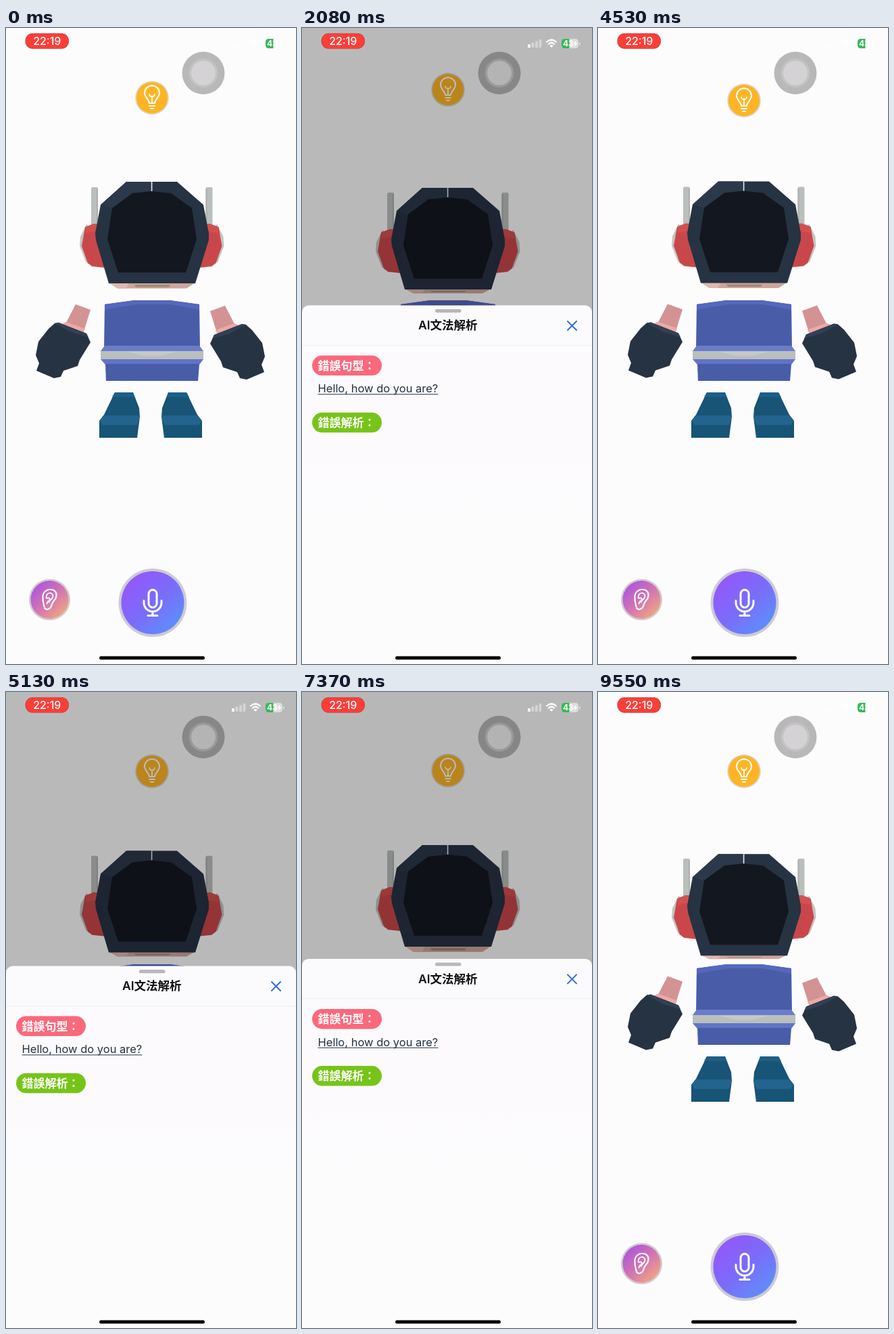
Animation, 429 px wide and 939 px high, one loop 9620 ms. Source, as an HTML page with a canvas:

```html
<!DOCTYPE html>
<html lang="zh-Hant">
<head>
<meta charset="utf-8">
<title>AI文法解析</title>
<style>
html, body { margin: 0; width: 100%; height: 100%; overflow: hidden; background: #fdfdfd; }
canvas { display: block; width: 429px; height: 939px; }
</style>
</head>
<body>
<canvas id="stage"></canvas>
<script>
const W = 429, H = 939, LOOP = 9620;
const canvas = document.getElementById('stage');
const ctx = canvas.getContext('2d');
const ratio = window.devicePixelRatio || 1;
canvas.width = W * ratio;
canvas.height = H * ratio;

const FONT = 'Inter, "Noto Sans CJK TC", "Noto Sans CJK", sans-serif';
const NAVY = '#263343', INDIGO = '#485ca8', SILVER = '#babfbc';

// Motion as [seconds, y] points
const bulbPath = [[0, 103], [1.05, 117], [2.12, 91], [3.24, 117], [4.15, 92], [4.53, 107], [5.15, 117],
  [5.99, 98], [6.25, 92], [7.25, 117], [8.2, 92], [8.49, 107], [9.35, 117], [9.62, 117]];
const headPath = [[0, 227], [0.6, 226], [1.5, 230], [2.08, 236], [2.65, 244], [3.27, 233], [4.3, 226],
  [4.53, 226.5], [5.95, 245], [7.4, 226], [8.49, 232], [9.2, 243], [9.62, 239]];
const sheetPath = [[0, H], [1.4, H], [1.85, 409], [3.45, 409], [3.85, H], [4.66, H], [5.04, 409],
  [5.4, 395], [5.99, 266], [6.4, 262], [7.6, 409], [8.15, 412], [8.49, 428], [8.8, 446], [9.15, H], [9.62, H]];

// Monotone cubic interpolation: smooth without overshoot
function follow(path, t) {
  const last = path.length - 2;
  let i = 0;
  while (i < last && t >= path[i + 1][0]) i++;
  const slope = k => (path[k + 1][1] - path[k][1]) / (path[k + 1][0] - path[k][0]);
  const tangent = k => {
    if (k < 1 || k > last) return 0;
    const a = slope(k - 1), b = slope(k);
    return a * b <= 0 ? 0 : 2 * a * b / (a + b);
  };
  const [t0, y0] = path[i], [t1, y1] = path[i + 1];
  const d = t1 - t0, u = (t - t0) / d, u2 = u * u, u3 = u2 * u;
  return y0 + (y1 - y0) * (3 * u2 - 2 * u3)
    + d * (tangent(i) * (u3 - 2 * u2 + u) + tangent(i + 1) * (u3 - u2));
}

function poly(color, points) {
  ctx.beginPath();
  for (let i = 0; i < points.length; i += 2) ctx.lineTo(points[i], points[i + 1]);
  ctx.closePath();
  ctx.fillStyle = color;
  ctx.fill();
}

function circle(x, y, r, color) {
  ctx.beginPath();
  ctx.arc(x, y, r, 0, Math.PI * 2);
  ctx.fillStyle = color;
  ctx.fill();
}

function roundRect(x, y, w, h, r, color) {
  ctx.beginPath();
  ctx.roundRect(x, y, w, h, r);
  ctx.fillStyle = color;
  ctx.fill();
}

function stroke(path, width, color = '#fff') {
  ctx.lineWidth = width;
  ctx.strokeStyle = color;
  ctx.lineCap = ctx.lineJoin = 'round';
  ctx.stroke(new Path2D(path));
}

function text(str, x, y, size, weight, color, align = 'left') {
  ctx.font = `${weight} ${size}px ${FONT}`;
  ctx.textAlign = align;
  ctx.fillStyle = color;
  ctx.fillText(str, x, y);
}

function at(x, y, draw) {
  ctx.save();
  ctx.translate(x, y);
  draw();
  ctx.restore();
}

// Draws a part and its mirror image; `sum` is twice the axis
function pair(sum, draw, drop = 0) {
  draw();
  at(sum, drop, () => { ctx.scale(-1, 1); draw(); });
}

function shade(x0, y0, x1, y1, ...colors) {
  const g = ctx.createLinearGradient(x0, y0, x1, y1);
  colors.forEach((c, i) => g.addColorStop(i / (colors.length - 1), c));
  return g;
}

function ear() {
  roundRect(126, 235, 10, 60, 2, SILVER);
  poly('#a9afac', [134, 238, 136, 237, 136, 292, 134, 292]);
  poly('#c3c5c2', [119, 290, 110, 308, 109, 322, 118, 345, 128, 353, 130, 300]);
  poly('#c9474a', [117, 294, 130, 289, 142, 290, 147, 354, 128, 352, 121, 347, 112, 322]);
  poly('#d4504f', [117, 294, 130, 289, 138, 290, 134, 300, 118, 303]);
}

function head(dy) {
  at(0, dy * 0.9, () => pair(431.5, ear));
  const chin = 384.5 - dy * 0.2;
  at(0, dy, () => {
    poly('#cda59c', [152, 376, 280, 376, 267, chin, 165, chin]);
    poly('#dfb7ae', [152, 376, 182, 376, 178, chin, 165, chin]);
    poly('#a18a78', [190, 379, 243, 379, 241, chin - 2, 192, chin - 2]);
    poly(NAVY, [178, 227, 253, 227, 292, 261, 300, 303, 300, 313, 280, 377,
      152, 377, 133, 313, 132, 303, 140, 261]);
    poly('#2b394a', [178, 227, 215, 227, 215, 241, 186, 244, 157, 266, 140, 261]);
    poly('#13171f', [187, 244, 215, 241, 244, 244, 275, 266, 282, 312, 266, 361,
      166, 361, 150, 312, 157, 266]);
    ctx.fillStyle = '#e8eaeb';
    ctx.fillRect(214.8, 227, 1.6, 14);
  });
}

function arm() {
  poly('#d39395', [103, 408, 125, 416, 116, 445, 89, 435]);
  poly('#eba9a7', [89, 434, 117, 444, 113, 454, 76, 440]);
  poly(NAVY, [72, 436, 78, 435, 119, 451, 125, 464, 109, 490, 106, 499, 85, 506,
    81, 515, 71, 517, 45, 506, 49, 495, 44, 483, 48, 463, 63, 444]);
  poly('#314052', [72, 436, 78, 435, 119, 451, 122, 457, 96, 449]);
}

function torso() {
  poly(INDIGO, [146, 408, 190, 402, 242, 402, 286, 408, 287, 475, 145, 475]);
  poly('#5568bd', [146, 408, 190, 402, 242, 402, 286, 408, 286, 416, 244, 408, 192, 408, 146, 416]);
  poly('#6c7ccc', [146, 469, 286, 469, 292, 477, 140, 477]);
  poly(SILVER, [140, 477, 292, 477, 292, 489, 140, 489]);
  poly('#c6c9c6', [180, 478, 252, 478, 230, 484, 202, 484]);
  poly('#6273c5', [140, 489, 292, 489, 286, 497, 147, 497]);
  poly(INDIGO, [147, 496, 286, 496, 284, 521, 148, 521]);
}

function foot() {
  poly('#175476', [161, 538, 188, 538, 197, 561, 198, 574, 194, 605, 138, 605, 138, 580, 145, 571]);
  poly('#1c6087', [161, 538, 188, 538, 190, 545, 157, 545]);
  poly('#22648d', [145, 572, 197, 572, 197, 578, 193, 586, 143, 586, 138, 580]);
}

function robot(dy) {
  head(dy);
  torso();
  at(0, dy * 0.93, () => pair(427, arm, 2));
  pair(428, foot);
}

function bulb(y) {
  at(216, y, () => {
    circle(0, 0, 25, '#dcdad8');
    circle(0, 0, 23.2, '#fdb525');
    stroke('M-4 8C-4 3-11-1-11-7A11 11 0 0 1 11-7C11-1 4 3 4 8Z', 2);
    stroke('M-4 12H4M-2 16H2M0 7V-2M-4-5Q-3-1 0-2Q3-1 4-5', 1.8);
  });
}

function earButton() {
  at(64.5, 844, () => {
    circle(0, 0, 30.5, '#cfcbd0');
    circle(0, 0, 28, shade(-18, -20, 18, 20, '#b259d6', '#d274b4', '#ee9f86'));
    stroke('M-10-2C-11-9-6-15 1-15C7-15 11-11 10-5C9 1 4 2 3 8C1 15-7 17-8 10C-9 5-10 3-10-2', 2.2);
    stroke('M-5-3C-5-11 5-12 5-5C5-1 0 0-1 4M-4-2Q1-4 0 1Q-3 2-4 6', 1.9);
  });
}

function micButton() {
  at(217, 848.5, () => {
    circle(0, 0, 50.5, '#cdcbd4');
    circle(0, 0, 46.5, shade(-28, -30, 28, 32, '#8f5bfb', '#7b6cfa', '#6289fb'));
    stroke('M-6-13A6 6 0 0 1 6-13V1A6 6 0 0 1-6 1Z', 3);
    stroke('M-13-3V0A13 13 0 0 0 13 0V-3M0 13V19M-7 19H7', 3);
  });
}

function touchButton() {
  circle(292, 66.5, 31.5, 'rgba(0,0,0,.27)');
  circle(292, 66.5, 21.5, 'rgba(255,250,255,.15)');
  circle(292, 66.5, 18, 'rgba(255,250,255,.27)');
}

function statusBar() {
  roundRect(28.5, 7.8, 64.5, 23, 11, '#c9433c');
  roundRect(29.3, 8.6, 63, 21.4, 10.5, '#fb3e38');
  text('22:19', 60.8, 25, 16, 500, '#fff', 'center');
  for (let i = 0; i < 4; i++) {
    const h = 5 + i * 2.4;
    roundRect(334 + i * 5.5, 29 - h, 3.8, h, 1, i ? 'rgba(255,255,255,.4)' : '#fff');
  }
  stroke('M362 20.5Q369 14.5 376 20.5M364.7 23.6Q369 20 373.3 23.6', 2.3);
  poly('#fff', [366.3, 26, 369, 24.6, 371.7, 26, 369, 29]);
  roundRect(384, 16, 25, 14, 4.2, 'rgba(255,255,255,.5)');
  roundRect(410, 21, 1.8, 4.5, 1, 'rgba(255,255,255,.5)');
  roundRect(384, 16, 11.5, 14, [4.2, 0, 0, 4.2], '#35b957');
  text('43', 386, 27.3, 12, 700, '#fff');
  poly('#fff', [405.5, 18, 401, 24, 404, 24, 402.6, 28.5, 407.5, 22.2, 404.5, 22.2]);
}

function label(str, y, color) {
  roundRect(15, y, 103, 29.5, 14.75, color);
  text(str, 23.5, y + 21.2, 17, 700, '#fff');
}

function sheet(y) {
  ctx.fillStyle = `rgba(0,0,0,${(H - y) * 0.0005})`;
  ctx.fillRect(0, 0, W, H);
  at(0, y, () => {
    roundRect(0, 0.5, W, H, 10, shade(0, 0, 0, 330, '#fbfafd', '#fcfafd', '#fdfcfd'));
    roundRect(197, 6, 38.5, 5.2, 2.6, '#bab7bc');
    text('AI文法解析', 215.7, 36.3, 17.5, 600, '#111', 'center');
    stroke('M393 24L406 37M406 24L393 37', 2, '#2b70d3');
    ctx.fillStyle = '#f0eff2';
    ctx.fillRect(0, 59, W, 1);
    label('錯誤句型：', 74.5, '#fa697b');
    text('Hello, how do you are?', 23.5, 129.3, 16.5, 400, '#263241');
    const width = ctx.measureText('Hello, how do you are?').width;
    ctx.fillStyle = '#263241';
    ctx.fillRect(23.5, 131.3, width, 1);
    label('錯誤解析：', 158.7, '#77c419');
  });
}

function draw(now) {
  const t = (now % LOOP) / 1000;
  const sheetY = follow(sheetPath, t);
  ctx.setTransform(ratio, 0, 0, ratio, 0, 0);
  ctx.fillStyle = '#fdfcfd';
  ctx.fillRect(0, 0, W, H);
  robot(follow(headPath, t) - 227);
  bulb(follow(bulbPath, t));
  earButton();
  micButton();
  if (sheetY < H - 0.5) sheet(sheetY);
  touchButton();
  statusBar();
  roundRect(138, 927.5, 156, 5, 2.5, '#070707');
}

const start = performance.now();
function tick() {
  draw(performance.now() - start);
  requestAnimationFrame(tick);
}
tick();
</script>
</body>
</html>
```
